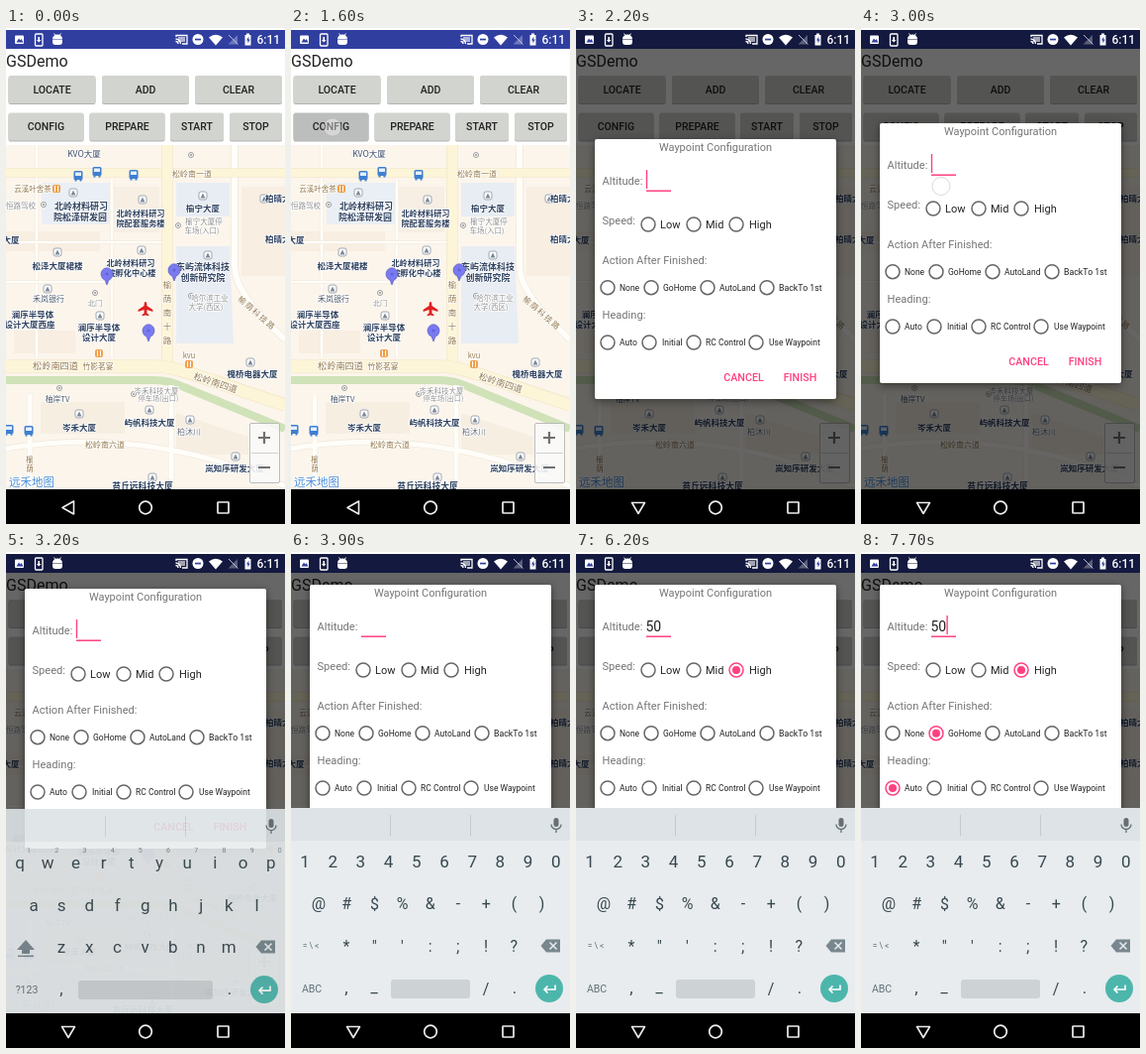
An HTML page that plays this animation: 282x500 px, repeating every 8 s.

```html
<!DOCTYPE html>
<html lang="zh-CN">
<head>
<meta charset="utf-8">
<title>Waypoint configuration</title>
<style>
html, body { margin: 0; width: 100%; height: 100%; overflow: hidden; background: #fff; }
svg { display: block; width: 282px; height: 500px; }
text { font-family: Roboto, "Noto Sans CJK SC", "Noto Sans CJK", sans-serif; dominant-baseline: central; white-space: pre; }
.map text { font-family: "Noto Sans CJK SC", "Noto Sans CJK", sans-serif; paint-order: stroke; stroke: #fff; stroke-width: 1.6px; stroke-linejoin: round; }
.raised { filter: drop-shadow(0 2px 4px rgba(0, 0, 0, .45)); }
</style>
</head>
<body>
<svg id="stage" viewBox="0 0 282 500"></svg>
<script>
const stage = document.getElementById('stage');
const clamp = v => Math.max(0, Math.min(1, v));
const ramp = (t, a, b) => clamp((t - a) / (b - a));
const smooth = u => u * u * (3 - 2 * u);
const PINK = '#ff4081', KEY = '#37474f', INK = '#2f4260', GREY = '#929292', ROAD = '#94784a', BUTTON = '#d2d4cf';

const text = (x, y, s, size, fill = '#000', extra = '') =>
  `<text x="${x}" y="${y}" font-size="${size}" fill="${fill}" ${extra}>${s.replace(/&/g, '&amp;').replace(/</g, '&lt;')}</text>`;
const mid = (x, y, s, size, fill, extra = '') => text(x, y, s, size, fill, 'text-anchor="middle" ' + extra);
const rect = (x, y, w, h, fill, extra = '') =>
  `<rect x="${x}" y="${y}" width="${w}" height="${h}" fill="${fill}" ${extra}/>`;
const circle = (x, y, r, fill, extra = '') => `<circle cx="${x}" cy="${y}" r="${r}" fill="${fill}" ${extra}/>`;
const path = (d, fill, extra = '') => `<path d="${d}" fill="${fill}" ${extra}/>`;
const line = (d, color, width) => path(d, 'none', `stroke="${color}" stroke-width="${width}"`);
const group = (id, body, extra = '') => `<g id="${id}" ${extra}>${body}</g>`;

// Map
function road(d, width, color = '#fffdf9', edge = '#efe6d8') {
  return line(d, edge, width + 1.2) + line(d, color, width);
}
const avenue = (d, width) => road(d, width, '#fdf5d8', '#f1e4c0');
const poi = ([x, y]) => rect(x - 4, y - 4, 8, 8, '#fff', 'rx="2" stroke="#8a94a3" stroke-width=".8"') +
  path(`M${x - 2.5} ${y + 2.5}L${x} ${y - 2.5}L${x + 2.5} ${y + 2.5}Z`, '#7d8896');
const bus = ([x, y]) => rect(x - 4.5, y - 5, 9, 9, '#3f7fd0', 'rx="1.5"') +
  rect(x - 3, y - 3.5, 6, 3.5, '#e4effc') + rect(x - 3.5, y + 4, 2, 1.5, '#3f7fd0') + rect(x + 1.5, y + 4, 2, 1.5, '#3f7fd0');
const food = ([x, y]) => rect(x - 4, y - 4, 8, 8, '#f0a04c', 'rx="2"') +
  line(`M${x - 1.5} ${y - 3}v6M${x + 1.5} ${y - 3}v6`, '#fff', 1);
const dot = ([x, y]) => circle(x, y, 2.5, '#fff', 'stroke="#9a9a9a"') + circle(x, y, .9, '#888');
const pin = ([x, y]) => path(`M${x} ${y + 10}L${x - 2} ${y + 5}A6 6.3 0 1 1 ${x + 2} ${y + 5}Z`, '#7a7af0', 'stroke="#5c5cc4" stroke-width=".7"') +
  circle(x, y - 1, 1.6, '#6363d8');
const label = (x, y, s, size = 8.5, color = INK, extra = '') => mid(x, y, s, size, color, (color === INK ? 'font-weight="700" ' : '') + extra);
const vertical = (x, y, s, step, size) => [...s].map((c, i) => label(x, y + i * step, c, size, ROAD)).join('');

const map = rect(0, 118, 282, 348, '#fcf5ec') +
  rect(36, 156, 70, 42, '#e9eff5') + rect(109, 160, 46, 46, '#f7efe4') +
  path('M172 156H226V190H172ZM172 220H226L230 318H172Z', '#e8edf3') +
  path('M0 205H95V225H0ZM8 305H70V328H8ZM238 160H282V250H238Z', '#f8eee2') +
  path('M35 377H120V409H35ZM172 388L245 412V430H172Z', '#f7eee2') +
  line('M0 355H150Q165 355 180 362L282 404', '#cfe2b8', 8) +
  road('M31 118V332M107 152V332', 3) + road('M0 216H160M0 256H108', 2.5) +
  road('M231 118V240Q231 268 282 314', 6) +
  road('M0 424C90 408 190 420 282 462M24 370V466M167 360V466', 5) +
  avenue('M0 146H282', 8) + avenue('M163 118V340', 10) + avenue('M0 341H150C175 341 200 354 282 380', 12) +
  [[52, 226], [68, 166], [138, 173], [199, 169], [261, 172], [137, 224], [204, 229], [95, 290], [42, 263],
   [74, 389], [145, 385], [186, 395], [232, 432], [148, 453], [247, 337]].map(poi).join('') +
  [[73, 149], [92, 145], [129, 148], [3, 405], [23, 406]].map(bus).join('') +
  [[51, 162], [94, 328], [185, 339]].map(food).join('') +
  [[90, 267], [187, 128], [38, 178], [174, 199], [187, 270], [54, 363], [129, 369]].map(dot).join('') +
  label(79, 126, 'KVO大厦', 8.5, '#3c4c66') + label(188, 146, '松岭南一道', 8, ROAD) +
  label(27, 161, '云溪叶舍茶', 7.5, ROAD) + label(15, 178, '恒路驾校', 7.5, GREY) +
  label(76, 179, '北岭材料研习', 9) + label(75, 190, '院松泽研发园', 9) +
  label(136, 186, '北岭材料研习', 8.2) + label(136, 196, '院配套服务楼', 8.2) +
  label(199, 181, '榆宁大厦') + label(200, 194, '榆宁大厦停', 7.5, GREY) + label(198, 203, '车场(入口)', 7.5, GREY) +
  label(279, 171, '柏晴大厦') + label(279, 212, '柏晴大厦') + label(5, 213, '大厦') +
  label(52, 239, '松泽大厦裙楼') + label(126, 236, '北岭材料研习', 8.2) + label(127, 246, '院孵化中心楼', 8.2) +
  label(199, 240, '东屿流体科技', 9) + label(199, 251, '创新研究院', 9) +
  label(206, 271, '哈尔滨工业', 7.5, GREY) + label(202, 280, '大学(西区)', 7.5, GREY) +
  label(43, 272, '禾岚银行', 8, '#4a5668') + label(90, 277, '北门', 7.2, GREY) +
  label(27, 288, '澜序半导体') + label(24, 298, '设计大厦西座') +
  label(94, 301, '澜序半导体') + label(94, 311, '设计大厦') +
  vertical(163, 258, '榆荫南十路', 14, 8.5) +
  label(254, 287, '榆荫科技路', 8, ROAD, 'transform="rotate(41 254 287)" letter-spacing="1.500"') +
  label(50, 340, '松岭南四道', 9.2, ROAD, 'font-weight="500"') + label(93, 340, '竹影茗宴', 7.8, ROAD) +
  label(185, 329, 'kvu', 7.5, ROAD) + label(212, 357, '松岭南四道', 9.2, ROAD, 'font-weight="500" transform="rotate(18 212 357)"') +
  label(249, 348, '槐桥电器大厦') + label(152, 365, '岑禾科技大厦', 7.5, GREY) + label(154, 373, '停车场(出口)', 7.2, GREY) +
  label(52, 373, '柚岸TV', 7.8, '#4a5668') + label(74, 402, '岑禾大厦') + label(145, 397, '屿帆科技大厦') +
  label(185, 406, '柏沐川', 8, '#6b7482') + label(100, 419, '松岭南六道', 8, ROAD) + vertical(24, 434, '榆荫', 9, 7.5) +
  label(231, 443, '岚知序研发大厦', 8.5) + label(138, 461, '苔丘远科技大厦', 8.8) +
  label(26, 457, '远禾地图', 11.5, '#4c8fd6') +
  [[102, 249], [170, 245], [144, 306]].map(pin).join('') +
  path('M141 276c1.200 0 1.400 2 1.400 4l6 4v2l-6-2v3.500l2 1.500v1.300l-3.400-.8-3.400.8v-1.300l2-1.500v-3.500l-6 2v-2l6-4c0-2 .2-4 1.400-4Z', '#e02020') +
  rect(246.5, 398.5, 30, 60, '#fafafa', 'rx="1.500" fill-opacity=".88" stroke="#b5b5b5" stroke-width=".9"') +
  line('M248 428.500H275', '#d0d0d0', 1) + line('M255 413H267M261 407V419M255 443H267', '#707070', 2.2);

// App buttons
const button = (x, y, w, s, id = '') => rect(x, y + 1, w, 28, '#b4b4b4', 'rx="2"') +
  rect(x, y, w, 28, BUTTON, `rx="2" ${id && `id="${id}"`}`) + mid(x + w / 2, y + 14, s, 10.5, '#222', 'font-weight="500"');
const app = rect(0, 20, 282, 446, '#fff') + rect(0, 2, 282, 19, '#303f9f') + text(0, 33, 'GSDemo', 16, '#222') +
  group('map', map, 'class="map"') +
  button(2.5, 48, 88, 'LOCATE') + button(97, 48, 88, 'ADD') + button(191, 48, 88, 'CLEAR') +
  button(2.5, 85.5, 76, 'CONFIG', 'config') + button(84.5, 85.5, 76, 'PREPARE') + button(166, 85.5, 54, 'START') + button(226, 85.5, 53, 'STOP');

// Dialog, laid out from its own top edge
const radio = (x, y, tx, s, size = 8.5, id = '') =>
  `<g ${id && `id="${id}"`}>` + circle(x, y, 15, PINK, 'class="ripple" opacity="0"') +
  circle(x, y, 7, 'none', 'class="ring" stroke="#666" stroke-width="1.500"') + circle(x, y, 4, PINK, 'class="core" opacity="0"') +
  '</g>' + text(tx, y, s, size, '#222');
const heading = (y, s) => text(26.5, y, s, 11.1, '#757575');
const dialog = rect(19, 0, 244, 262, '#fff', 'rx="2" class="raised"') +
  mid(141, 8, 'Waypoint Configuration', 11, '#757575') +
  heading(42, 'Altitude:') + heading(82, 'Speed:') + heading(122, 'Action After Finished:') + heading(177.5, 'Heading:') +
  text(70.5, 41.5, '', 14, '#222', 'id="altitude"') + line('M71 52.200H96', PINK, 1.5) +
  rect(0, 31, 1.4, 19, PINK, 'id="cursor"') +
  radio(73, 86, 85, 'Low', 11) + radio(119, 86, 131, 'Mid', 11) + radio(162, 86, 175, 'High', 11, 'high') +
  radio(32, 149.7, 44, 'None') + radio(76, 149.7, 88, 'GoHome', 8.5, 'goHome') +
  radio(133, 149.7, 145, 'AutoLand') + radio(193, 149.7, 205, 'BackTo 1st', 8.8) +
  radio(32, 205, 44, 'Auto', 8.5, 'auto') + radio(74, 205, 87, 'Initial') +
  radio(119, 205, 131, 'RC Control') + radio(182, 205, 195, 'Use Waypoint') +
  mid(169.5, 240, 'CANCEL', 10.7, PINK, 'font-weight="500"') + mid(226.5, 240, 'FINISH', 10.7, PINK, 'font-weight="500"');

// Keyboard
const keys = (x, y, s, size = 17, fill = KEY) => [...s].map((c, i) => mid(x + 28.2 * i, y, c, size, fill)).join('');
const space = (x, w) => rect(x, 431, w, 19, '#cdd2d5', 'rx="3"');
const keyboard = rect(0, 258, 282, 208, '#e8ecee') + rect(0, 258, 282, 33, '#dde3e6') +
  line('M100.500 265V286M181.500 265V286', '#c3cbcf', 1) +
  rect(265.5, 268, 5, 9, '#666f74', 'rx="2.500"') + line('M263 274.500a5 5 0 0 0 10 0M268 279.500v3.500', '#666f74', 1.3) +
  group('letters', keys(14, 312, 'qwertyuiop') + keys(23, 299.5, '1234567890', 7, '#78878e') +
    keys(28, 354.5, 'asdfghjkl') + keys(56, 397, 'zxcvbnm') +
    path('M20 390L11 400H16V404H24V400H29Z', '#78878e') + rect(12, 405.5, 16, 1.5, '#78878e') +
    mid(21, 440, '?123', 10.5, '#607078') + space(73, 136)) +
  group('symbols', keys(14, 312, '1234567890') + keys(28, 354.5, '@#$%&-+()', 16) +
    mid(20, 397, '= \\ <', 8.5, '#607078') + keys(56, 397, '*"\':;!?', 16) + mid(21, 440, 'ABC', 10.5, '#607078') +
    mid(84, 438, '_', 16, KEY) + mid(197, 440, '/', 16, KEY) + space(101, 80)) +
  mid(56, 439, ',', 17, KEY) + mid(226, 439, '.', 17, KEY) +
  path('M252.500 397L258 390.500H272V403.500H258Z', '#78878e') + line('M261.500 393.500l7 7m0-7l-7 7', '#e8ecee', 1.5) +
  circle(261, 440, 14, '#4db6ac') + line('M267 436.500V441H256M259.500 437.500L256 441L259.500 444.500', '#fff', 1.6);

const popup = rect(-19, 241, 38, 87, '#d8dddf', 'rx="2" class="raised"') +
  mid(0, 264, '', 24, '#263238', 'id="popupChar"') + mid(12, 279, '...', 9, '#607078');

// System bars
const statusIcons = rect(9, 7.5, 9, 8.5, '#fff', 'rx="1"') + path('M10.500 14.500l2.500-4 1.500 2 1-1.500 2 3.500Z', '#303f9f') +
  rect(29.5, 6, 7.5, 12, 'none', 'rx="1" stroke="#fff" stroke-width="1.300"') + path('M33.200 14.500l-2.300-2.500h1.500v-3h1.600v3h1.500Z', '#fff') +
  path('M47 11a5 4.500 0 0 1 10 0ZM47 11.500H57V14Q57 17 54 17H50Q47 17 47 14Z', '#fff') + line('M48.500 5.500l1.500 2M55.500 5.500l-1.500 2', '#fff', 1) +
  line('M172 9V7.500H183V16H178M171.500 11a5 5 0 0 1 5 5M171.500 13.500a2.500 2.500 0 0 1 2.500 2.500', '#fff', 1.3) + rect(174, 9, 7, 5, '#fff', 'opacity=".6"') +
  circle(194, 11.5, 5.5, '#fff') + rect(191, 10.7, 6, 1.7, '#303f9f') +
  path('M205 9.500Q212 4 219 9.500L212 17.500Z', '#fff') +
  path('M234 7V16.500H224.500Z', '#fff', 'opacity=".3"') + line('M225 7L234.500 16.500', '#b8bede', 1) +
  path('M241.500 7H243V5.500H246V7H247.500V17.500H241.500Z', '#fff') + path('M245.500 8.500l-2.500 4h1.500v3l2.200-4h-1.500Z', '#303f9f') +
  text(253.5, 12, '6:11', 12, '#fff', 'font-weight="500"');
const BACK = 'M57 483.500L68.500 477V490Z', HIDE = 'M56.500 478.500H69.500L63 489.500Z';
const nav = rect(0, 465, 282, 35, '#000') +
  path(BACK, 'none', 'id="back" stroke="#eee" stroke-width="1.600" stroke-linejoin="round"') +
  circle(141, 483.5, 6.3, 'none', 'stroke="#eee" stroke-width="1.700"') +
  rect(214, 478, 11, 11, 'none', 'rx=".5" stroke="#eee" stroke-width="1.700"');

stage.innerHTML = rect(0, 0, 282, 500, '#fff') + app + rect(0, 2, 282, 464, '#000', 'id="dim"') +
  group('dialog', dialog) + group('keyboard', keyboard) + group('popup', popup) + statusIcons + nav +
  circle(0, 0, 9, '#fff', 'id="touch" fill-opacity=".6" stroke="#999" stroke-opacity=".4" stroke-width=".9"');

const $ = id => document.getElementById(id);
const set = (id, name, value) => $(id).setAttribute(name, value);
const show = (id, on) => set(id, 'opacity', +on);

// start, end, x, y
const taps = [
  [1400, 1700, 42, 100], [2800, 3200, 81, 159.5], [3700, 3900, 21, 440], [4300, 4500, 127, 313],
  [4600, 4900, 262, 313], [5500, 5800, 162, 119], [6500, 6800, 76, 183], [6900, 7200, 32, 238]];
const choices = { high: 5700, goHome: 6700, auto: 7100 };

function cursorOn(t) {
  if (t >= 4700) return Math.floor((t - 4700) / 500) % 2 === 0;
  return t < 2300 || (t >= 2800 && t < 3700) || t >= 4300;
}

function draw(t) {
  const open = ramp(t, 1650, 1850), scale = .9 + .1 * smooth(open);
  const top = Math.round(112 - 79 * smooth(ramp(t, 2901, 3247)));
  set('dim', 'opacity', .6 * ramp(t, 1700, 2050));
  set('dialog', 'opacity', open);
  set('dialog', 'transform', `translate(${141 * (1 - scale)} ${top + 131 * (1 - scale)}) scale(${scale})`);
  set('config', 'fill', t >= 1500 && t < 1800 ? '#bcbdbd' : BUTTON);
  set('back', 'd', t < 2000 ? BACK : HIDE);

  const value = t < 4400 ? '' : t < 4700 ? '5' : '50';
  $('altitude').textContent = value;
  set('cursor', 'x', 70.8 + value.length * 7.8);
  show('cursor', cursorOn(t));

  const raised = ramp(t, 3040, 3220);
  set('keyboard', 'opacity', raised);
  set('keyboard', 'transform', `translate(0 ${10 * (1 - raised)})`);
  show('letters', t < 3800);
  show('symbols', t >= 3800);

  const five = t >= 4400 && t < 4600, zero = t >= 4700 && t < 4900;
  show('popup', five || zero);
  set('popup', 'transform', `translate(${five ? 127 : 260} 0)`);
  $('popupChar').textContent = five ? '5' : '0';

  for (const [id, at] of Object.entries(choices)) {
    const part = name => $(id).querySelector(name), chosen = t >= at;
    part('.ring').setAttribute('stroke', chosen ? PINK : '#666');
    part('.core').setAttribute('opacity', +chosen);
    part('.ripple').setAttribute('opacity', t >= at - 100 ? .18 * (1 - ramp(t, at, at + 200)) : 0);
  }

  const tap = taps.find(([a, b]) => t >= a && t < b);
  set('touch', 'opacity', tap ? 1 - .7 * ramp(t, tap[1] - 200, tap[1]) : 0);
  if (tap) set('touch', 'transform', `translate(${tap[2]} ${tap[3]})`);
}

const start = performance.now();
function tick() {
  const t = (performance.now() - start) % 8000;
  draw(Math.floor(t / 100) * 100);
  requestAnimationFrame(tick);
}
tick();
</script>
</body>
</html>
```
